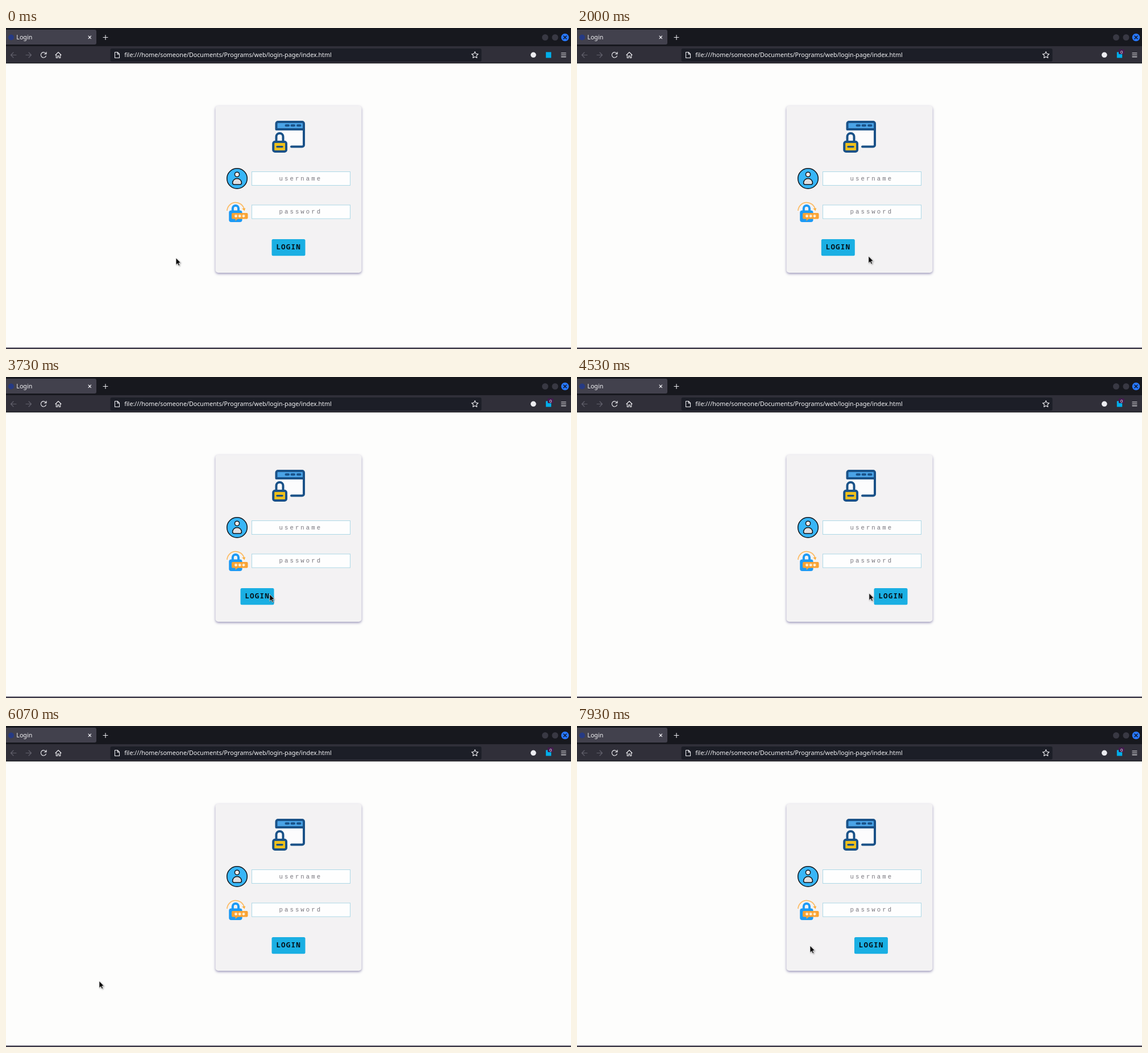
Recreate the animation shown at these times as an HTML page. Size 994 px wide and 564 px high, loop 8 s.

```html
<!DOCTYPE html>
<html lang="en">
<head>
<meta charset="utf-8">
<title>Login</title>
<style>
  html, body { margin: 0; width: 100%; height: 100%; overflow: hidden; background: #fdfdfc; }
  svg { display: block; width: 994px; height: 564px; }
  text { white-space: pre; }
  .ui { font: 10.7px "Noto Sans", sans-serif; fill: #f4f4f6; }
  .hint { font: 10.67px "Liberation Mono", monospace; letter-spacing: 3.05px; fill: #77757d; }
  .label { font: 600 12.6px "Noto Sans Mono", monospace; letter-spacing: 1.15px; fill: #04121a; }
  .line { fill: none; stroke: #ececf0; stroke-width: 1.1; stroke-linecap: round; stroke-linejoin: round; }
  .dim { stroke: #62616c; }
  .navy { fill: none; stroke: #1a5288; stroke-width: 4; stroke-linecap: round; stroke-linejoin: round; }
  .card { filter: drop-shadow(0 2.5px 2px rgba(60, 50, 120, .5)); }
  #cursor { filter: drop-shadow(1px 1px 1px rgba(0, 0, 0, .35)); }
</style>
</head>
<body>
<svg viewBox="0 0 994 564">
  <!-- browser window -->
  <rect width="994" height="32" fill="#17181e"/>
  <path d="M0 3H156a3 3 0 0 1 3 3V26a3 3 0 0 1-3 3H0Z" fill="#42414d"/>
  <circle cx="9" cy="16.5" r="5" fill="#263a83"/>
  <text class="ui" x="18.3" y="20.3">Login</text>
  <path class="line" d="M145 14l4.6 4.6m0-4.6l-4.6 4.6M171 16.5h8m-4-4v8"/>
  <circle cx="948.5" cy="16.5" r="5.5" fill="#383843"/>
  <circle cx="966" cy="16.5" r="5.5" fill="#383843"/>
  <circle cx="983.5" cy="16.5" r="6.8" fill="#2777ff"/>
  <path class="line" d="M981 14l5 5m0-5l-5 5" style="stroke:#101726;stroke-width:1.5"/>

  <rect y="32" width="994" height="30" fill="#302f39"/>
  <rect y="61" width="994" height="1.5" fill="#15151a"/>
  <rect x="183.5" y="36" width="653" height="23" rx="3" fill="#1c1e27"/>
  <path class="line dim" d="M18 47.5H8.5m4.5-4.5l-4.5 4.5l4.5 4.5M35 47.5h9.5m-4.5-4.5l4.5 4.5l-4.5 4.5"/>
  <path class="line" d="M70.3 45.2a4.7 4.7 0 1 0 .2 3.8M71 42.3v3.5h-3.5"/>
  <path class="line" d="M87 47.5l5-5l5 5M88.3 46.7v5.8h2.4v-3.4h2.6v3.4h2.4v-5.8"/>
  <path class="line" d="M191.5 42.5h4.8l3.2 3.2v6.8h-8ZM196 42.7v3.2h3.2"/>
  <text class="ui" x="208.2" y="51.2">file:///home/someone/Documents/Programs/web/login-page/index.html</text>
  <path id="star" class="line"/>
  <circle cx="927.8" cy="47.3" r="4.8" fill="#ececf1"/>
  <rect x="949.8" y="42.3" width="9.4" height="10.2" fill="#00aeea"/>
  <g id="badge">
    <rect x="953" y="37.5" width="10" height="8.5" rx="1.5" fill="#431c4e"/>
    <text x="956" y="44.5" font-family="Noto Sans, sans-serif" font-size="7.5" fill="#fff">0</text>
  </g>
  <path class="line" d="M977 44h8m-8 3.3h8m-8 3.3h8"/>

  <!-- page -->
  <rect y="62.5" width="994" height="499" fill="#fdfdfc"/>
  <rect y="561" width="994" height="1" fill="#a19fa7"/>
  <rect y="562" width="994" height="2" fill="#3c3948"/>
  <rect class="card" x="368.5" y="136.5" width="257" height="293.5" rx="5" fill="#f3f2f3"/>

  <!-- window with padlock -->
  <path d="M476 178H524V208H476Z" fill="#fcfcfd"/>
  <path class="navy" d="M524 178V205.5a3 3 0 0 1-3 3H502"/>
  <path class="navy" d="M475.5 178V168a3 3 0 0 1 3-3H521a3 3 0 0 1 3 3V178Z" style="fill:#4aa3e6"/>
  <path class="navy" d="M492.5 171.3h4.5m5.5 0h4.5m6 0h4.5"/>
  <path class="navy" d="M475.5 200V191a6 6 0 0 1 12 0V200"/>
  <rect class="navy" x="470.2" y="200" width="22.8" height="17" rx="3" style="fill:#efc11b"/>
  <path class="navy" d="M477 208.6h9" style="stroke-width:3.4"/>

  <!-- user -->
  <g stroke="#10151b" stroke-width="1.5">
    <circle cx="406.5" cy="264.5" r="17.8" fill="#38b6f8"/>
    <circle cx="406.5" cy="257.3" r="4.1" fill="#f0eded"/>
    <path d="M398.5 272a8 7.5 0 0 1 16 0q0 3-3 3h-10q-3 0-3-3Z" fill="#e1dfe1"/>
  </g>

  <!-- password -->
  <path d="M388.9 321A15.2 15.2 0 0 1 418.8 318" fill="none" stroke="#fbbd68" stroke-width="1.8"/>
  <path d="M415.2 317.2l6-.7l-1.6 4.9Z" fill="#fbb040"/>
  <path d="M398.8 323v-6a5.1 5.1 0 0 1 10.2 0v6" fill="none" stroke="#1c9af5" stroke-width="4"/>
  <rect x="392.2" y="320.5" width="23.3" height="20.5" rx="4" fill="#1c9af5"/>
  <path d="M399 325h24.5a2 2 0 0 1 2 2v6.5a2 2 0 0 1-2 2H408l-4.5 3.5v-3.5H399a2 2 0 0 1-2-2V327a2 2 0 0 1 2-2Z" fill="#f9a334"/>
  <path id="stars" fill="none" stroke="#fff3de" stroke-width="1.2"/>

  <g fill="#fefefe" stroke="#add8e6">
    <rect x="432.5" y="252.5" width="173" height="24"/>
    <rect x="432.5" y="311" width="173" height="24"/>
  </g>
  <text class="hint" x="480.6" y="268">username</text>
  <text class="hint" x="480.6" y="326.4">password</text>

  <g id="button">
    <rect x="467.5" y="371" width="59" height="29.2" rx="2.5" fill="#1aafe3"/>
    <text class="label" x="475.4" y="389.4">LOGIN</text>
  </g>
  <path id="cursor" d="M0 0V12.2L2.8 9.7L4.7 13.8L6.7 12.9L4.9 8.9L8.4 8.6Z" fill="#0a0a0a" stroke="#fff" stroke-width=".7"/>
</svg>
<script>
const LOOP = 8000, SLIDE = 300, REACH = 55, BADGE_AT = 1500;
const $ = id => document.getElementById(id);
const move = (id, x, y) => $(id).setAttribute('transform', `translate(${x} ${y})`);
const mix = (a, b, p) => a + (b - a) * p;
const easeOut = p => 1 - (1 - p) ** 3;

// spokes or star corners around a centre
const ring = (n, x, y, radius) => Array.from({ length: n }, (_, i) => {
  const a = i * 2 * Math.PI / n, r = radius(i);
  return `${x + r * Math.sin(a)} ${y - r * Math.cos(a)}`;
});
$('star').setAttribute('d', `M${ring(10, 825, 47.6, i => i % 2 ? 2.9 : 6).join('L')}Z`);
$('stars').setAttribute('d', [0, 1, 2].map(i => {
  const x = 404.5 + i * 6.75, y = 330.2;
  return ring(6, x, y, () => 2.8).map(end => `M${x} ${y}L${end}`).join('');
}).join(''));

// the button dodges at a steady beat, rests in the middle, then is chased again
const dodges = Array.from({ length: 6 }, (_, i) => ({ time: 1905 + i * 677, x: i % 2 ? REACH : -REACH }));
dodges.push({ time: 5750, x: 0 }, { time: 6850, x: -REACH }, { time: 7835, x: REACH });

function buttonX(t) {
  const past = dodges.filter(d => d.time <= t);
  if (!past.length) return 0;
  const [from, to] = [{ x: 0 }, ...past].slice(-2);
  return mix(from.x, to.x, easeOut(Math.min(1, (t - to.time) / SLIDE)));
}

// turning points of the pointer: [ms, x, y]
const turns = [
  [530, 299, 404], [1330, 452, 384], [2000, 513, 401], [2950, 405, 384], [3300, 516, 384],
  [4060, 424, 380], [4600, 527, 380], [5670, 407, 386], [6070, 164, 448], [6300, 150, 478],
  [6530, 418, 445], [7400, 516, 387], [7670, 516, 387], [7930, 410, 386]
];

function cursorAt(t) {
  const next = turns.findIndex(k => k[0] > t);
  if (next <= 0) return turns.at(next).slice(1);
  const [t0, x0, y0] = turns[next - 1], [t1, x1, y1] = turns[next];
  const p = (t - t0) / (t1 - t0);
  return [mix(x0, x1, p), mix(y0, y1, p)];
}

const start = performance.now();
function draw() {
  const t = Math.max(0, performance.now() - start) % LOOP;
  move('button', buttonX(t), 0);
  move('cursor', ...cursorAt(t));
  $('badge').style.opacity = t < BADGE_AT ? 0 : 1;
  requestAnimationFrame(draw);
}
draw();
</script>
</body>
</html>
```
